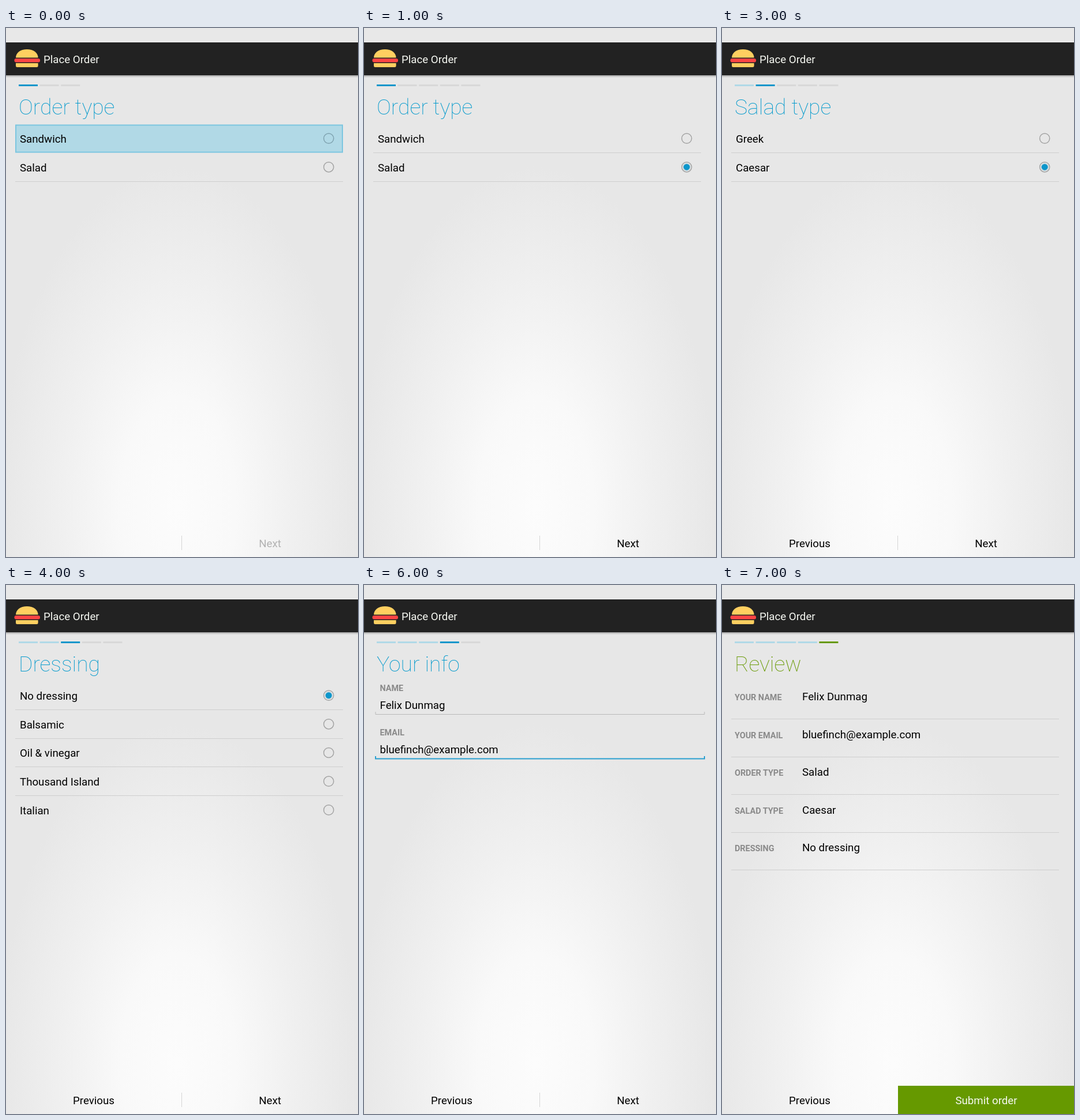
Animation of 610x918 px, one loop 8 s. Source, as an HTML page:

```html
<!DOCTYPE html>
<html lang="en">
<head>
<meta charset="utf-8">
<title>Place Order</title>
<style>
  html, body { margin: 0; width: 100%; height: 100%; overflow: hidden; background: #e7e7e7; }
  svg { display: block; width: 610px; height: 918px; }
  text { font: 400 18.7px Roboto, sans-serif; fill: #000; white-space: pre; }
  .title { font-size: 37.3px; font-weight: 100; }
  .label { font-size: 14.4px; font-weight: 700; fill: #8a8a8a; }
  .hint { fill: #808080; }
  .off { fill: #b2b2b2; }
  .light { fill: #f6f8f2; }
  .mid { text-anchor: middle; }
</style>
</head>
<body>
<svg viewBox="0 0 610 918">
  <defs>
    <radialGradient id="glow" gradientUnits="userSpaceOnUse" cx="0" cy="0" r="1"
      gradientTransform="translate(298 830) scale(312 590)">
      <stop offset="0" stop-color="#fcfcfc"/>
      <stop offset=".32" stop-color="#f9f9f9"/>
      <stop offset=".64" stop-color="#f0f0f0"/>
      <stop offset="1" stop-color="#e7e7e7"/>
    </radialGradient>
    <linearGradient id="shade" x2="0" y2="1">
      <stop offset="0" stop-color="#000" stop-opacity=".28"/>
      <stop offset="1" stop-color="#000" stop-opacity="0"/>
    </linearGradient>
  </defs>
  <rect width="610" height="918" fill="url(#glow)"/>
  <rect width="610" height="25" fill="#e8e8e8"/>
  <rect y="25" width="610" height="57" fill="#222"/>
  <rect y="82" width="610" height="4" fill="url(#shade)"/>
  <path d="M17 51.5C17 43 25 37 36.3 37S55.6 43 55.6 51.5Z" fill="#ffcf60"/>
  <rect x="14.5" y="53" width="44.5" height="6.5" rx="3" fill="#f44"/>
  <path d="M17 61H55.6V65.5Q55.6 68 53 68H19.6Q17 68 17 65.5Z" fill="#ffcf60"/>
  <text x="65" y="61" class="light">Place Order</text>
  <g id="page"></g>
</svg>
<script>
const BLUE = '#0d96cb', GREEN = '#669900', DONE = '#b0d9e7', TODO = '#d8d8d8';
const NAME = 'Felix Dunmag', EMAIL = 'bluefinch@example.com';
const SECOND = 1000;
const page = document.getElementById('page');

const rect = (x, y, w, h, fill) =>
  `<rect x="${x}" y="${y}" width="${w}" height="${h}" fill="${fill}"/>`;
const text = (x, y, s, cls = '', style = '') =>
  `<text x="${x}" y="${y}" class="${cls}" style="${style}">${s}</text>`;
const rule = y => rect(16, y, 568, 1, '#cecece');

function header(title, steps, current, color = BLUE) {
  let out = '';
  for (let i = 0; i < steps; i++) {
    const fill = i < current ? DONE : i === current ? color : TODO;
    out += rect(22 + 36.6 * i, 98, 33, 3, fill);
  }
  return out + text(22, 149.5, title, 'title', `fill:${color === BLUE ? '#0099cc' : color}`);
}

function radio(y, checked, pressed) {
  const ring = `<circle cx="559.2" cy="${y}" r="8.6" fill="none" stroke="${pressed ? '#7fa3b0' : '#a4a4a4'}" stroke-width="1.5"/>`;
  const dot = `<circle cx="559.2" cy="${y}" r="6.6" fill="#b9d3dd"/><circle cx="559.2" cy="${y}" r="5.4" fill="${BLUE}"/>`;
  return ring + (checked ? dot : '');
}

function choices(items, { checked = -1, pressed = -1, lastRule = true } = {}) {
  return items.map((item, i) => {
    const y = 191.6 + 49.7 * i;
    const box = i === pressed
      ? '<rect x="17" y="168.5" width="566" height="47" fill="#b1d9e6" stroke="#7cc6e0" stroke-width="2"/>' : '';
    const line = i !== pressed && (lastRule || i < items.length - 1) ? rule(216 + Math.round(49.7 * i)) : '';
    return box + line + text(24, y + 7.2, item) + radio(y, i === checked, i === pressed);
  }).join('');
}

function field(y, label, value, focused, hint) {
  const color = focused ? '#2a9fd0' : '#b8b8b8', w = focused ? 2 : 1, base = y + 41;
  const line = `<path d="M20 ${base - 4.5}V${base}H590V${base - 4.5}" fill="none" stroke="${color}" stroke-width="${w}"/>`;
  return text(27.5, y, label, 'label') + text(27.5, y + 31.3, value, hint ? 'hint' : '') + line;
}

function review(rows) {
  return rows.map(([label, value], i) => {
    const y = 200 + 65.5 * i;
    return text(22, y, label, 'label') + text(139, y, value) + rule(Math.round(232.4 + 65.5 * i));
  }).join('');
}

function footer(previous, next) {
  return rect(304, 881, 1, 25, '#d6d6d6') +
    (previous ? text(152, 900.5, 'Previous', 'mid') : '') +
    text(457.5, 900.5, 'Next', next ? 'mid' : 'mid off');
}

const types = ['Sandwich', 'Salad'], salads = ['Greek', 'Caesar'];
const dressings = ['No dressing', 'Balsamic', 'Oil &amp; vinegar', 'Thousand Island', 'Italian'];

const scenes = [
  header('Order type', 3, 0) + choices(types, { pressed: 0 }) + footer(false, false),
  header('Order type', 5, 0) + choices(types, { checked: 1 }) + footer(false, true),
  header('Salad type', 5, 1) + choices(salads) + footer(true, false),
  header('Salad type', 5, 1) + choices(salads, { checked: 1 }) + footer(true, true),
  header('Dressing', 5, 2) + choices(dressings, { checked: 0, lastRule: false }) + footer(true, true),
  header('Your info', 5, 3) + field(183.5, 'NAME', 'e.g. Betty', true, true) +
    rect(28, 195, 1, 25, '#111') + field(260.5, 'EMAIL', 'Optional', false, true) + footer(true, false),
  header('Your info', 5, 3) + field(183.5, 'NAME', NAME) + field(260.5, 'EMAIL', EMAIL, true) + footer(true, true),
  header('Review', 5, 4, GREEN) +
    review([['YOUR NAME', NAME], ['YOUR EMAIL', EMAIL], ['ORDER TYPE', 'Salad'],
      ['SALAD TYPE', 'Caesar'], ['DRESSING', 'No dressing']]) +
    text(152, 900.5, 'Previous', 'mid') + rect(305, 869, 305, 49, GREEN) +
    text(458, 900.5, 'Submit order', 'mid light')
];

let shown = -1;
function draw(time) {
  const i = Math.floor(time / SECOND) % scenes.length;
  if (i !== shown) page.innerHTML = scenes[shown = i];
}

const start = performance.now();
function tick() {
  draw(performance.now() - start);
  requestAnimationFrame(tick);
}
tick();
</script>
</body>
</html>
```
